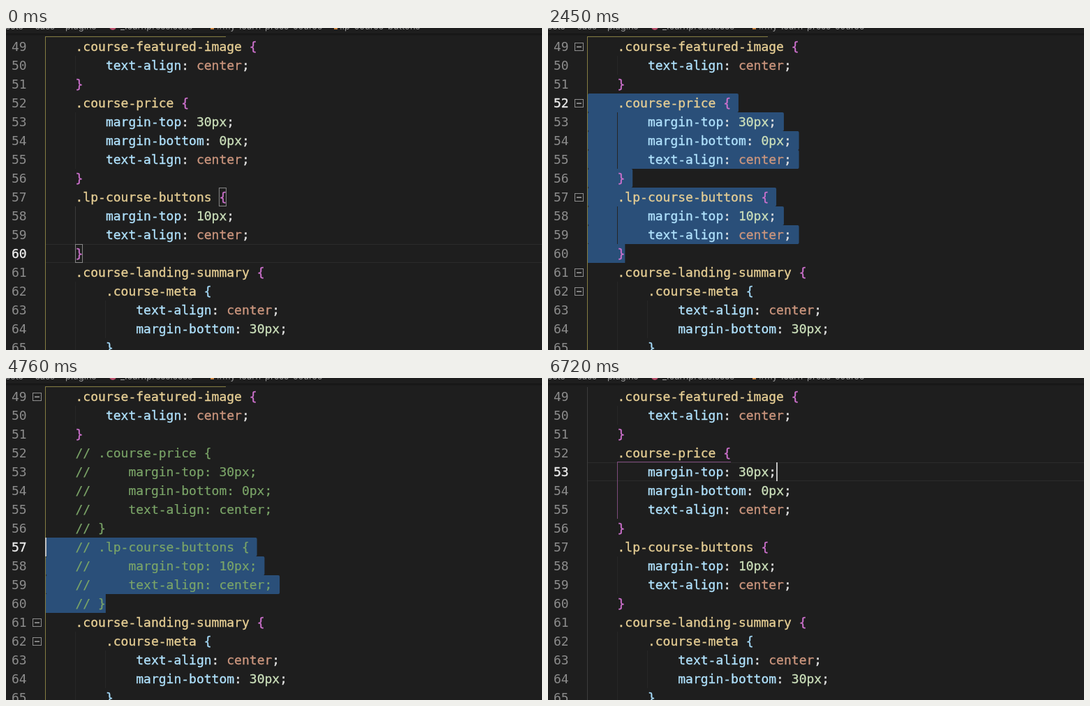
Animation, 768 px wide and 462 px high, one loop 6.79 s. Source, as an HTML page:

```html
<!DOCTYPE html>
<html lang="en">
<head>
<meta charset="utf-8">
<title>Commenting out a block</title>
<style>
html, body { margin: 0; width: 100%; height: 100%; overflow: hidden; background: #1e1e1e; }
svg { display: block; width: 768px; height: 462px; }
text { white-space: pre; }
.code { font: 18px "DejaVu Sans Mono", monospace; fill: #e4e4e4; stroke: #e4e4e4; stroke-width: 0.35px; }
.crumb { font: 13px Inter, sans-serif; fill: #9c9c9c; }
.num { fill: #8c8c8c; stroke: none; }
.num.active { fill: #ececec; stroke: #ececec; }
.selector { fill: #e6ce94; stroke: #e6ce94; }
.prop { fill: #b0e2fd; stroke: #b0e2fd; }
.value { fill: #cc967e; stroke: #cc967e; }
.digit { fill: #cbdfba; stroke: #cbdfba; }
.brace { fill: #cf72cf; stroke: #cf72cf; }
.deep { fill: #a5daf8; stroke: #a5daf8; }
.comment { fill: #7ba568; stroke: #7ba568; stroke-width: 0.2px; }
</style>
</head>
<body>
<svg id="stage" viewBox="0 0 768 462"></svg>
<script>
const LOOP = 6790, LEFT = 56.2, CHAR = 10.836, ROW = 27, TOP = 13, FIRST = 49;
const LINES = `    .course-featured-image {
        text-align: center;
    }
    .course-price {
        margin-top: 30px;
        margin-bottom: 0px;
        text-align: center;
    }
    .lp-course-buttons {
        margin-top: 10px;
        text-align: center;
    }
    .course-landing-summary {
        .course-meta {
            text-align: center;
            margin-bottom: 30px;
        }`.split("\n");

const stage = document.getElementById("stage");
const colX = c => LEFT + c * CHAR;
const rowY = n => TOP + (n - FIRST) * ROW;
const inBlock = n => n >= 52 && n <= 60;
const commented = s => s.slice(0, 4) + "// " + s.slice(4);
const lineText = (n, off) => off && inBlock(n) ? commented(LINES[n - FIRST]) : LINES[n - FIRST];

function add(tag, attrs, parent = stage, text) {
  const el = document.createElementNS("http://www.w3.org/2000/svg", tag);
  for (const k in attrs) el.setAttribute(k, attrs[k]);
  if (text !== undefined) el.textContent = text;
  return parent.appendChild(el);
}
const group = () => add("g", {});
const rect = (x, y, width, height, fill, parent) => add("rect", { x, y, width, height, fill }, parent);
const show = (el, on) => { el.style.display = on ? "" : "none"; };

function tokens(s) {
  const body = s.trim(), deep = s.startsWith("        ");
  const brace = deep ? "deep" : "brace";
  if (body === "}") return [[body, brace]];
  if (body[0] === ".") return [[body.slice(0, -1), "selector"], ["{", brace]];
  const [prop, value] = body.slice(0, -1).split(": ");
  return [[prop, "prop"], [": ", ""], [value, /\d/.test(value) ? "digit" : "value"], [";", ""]];
}

function drawLine(n, parent, off) {
  const s = LINES[n - FIRST], y = rowY(n) + 20;
  const text = add("text", { x: colX(4), y, class: "code" }, parent);
  if (off) return add("tspan", { class: "comment" }, text, commented(s).slice(4));
  text.setAttribute("x", colX(s.search(/\S/)));
  for (const [word, kind] of tokens(s)) add("tspan", { class: kind }, text, word);
}

// Current line and selection
const lineMark = group();
const markTop = rect(57, 0, 711, 1, "#2b2b2b", lineMark);
const markEnd = rect(57, 0, 711, 1, "#2b2b2b", lineMark);
const selection = [];
for (let n = 52; n <= 60; n++) {
  const r = rect(57, rowY(n), 0, ROW, "#2a4f79");
  if (n < 60) r.setAttribute("rx", 2);
  selection.push(r);
}

// Indent guides
const guide = (col, from, to, color, parent) =>
  rect(Math.floor(colX(col)), rowY(from), 1, (to - from + 1) * ROW, color, parent);
guide(4, 50, 50, "#262626");
guide(4, 62, 65, "#262626");
guide(8, 63, 64, "#262626");
const blockGuides = group(), nearGuide = group();
guide(4, 53, 55, "#262626", blockGuides);
guide(4, 58, 59, "#262626", blockGuides);
guide(4, 58, 59, "#3a3a3a", nearGuide);
const outerPlain = guide(0, 49, 65, "#3c3c3c");
const outerActive = group();
guide(0, 49, 65, "#857d42", outerActive);
rect(56, 12, 259, 1, "#857d42", outerActive);
const innerActive = group();
guide(4, 53, 55, "#7d4a7c", innerActive);
rect(99, 120, 163, 1, "#7d4a7c", innerActive);

// Code
const plain = group(), hidden = group();
const numbers = LINES.map((_, i) => {
  const n = FIRST + i;
  if (inBlock(n)) {
    drawLine(n, plain);
    drawLine(n, hidden, true);
  } else drawLine(n);
  return add("text", { x: 8, y: rowY(n) + 20, class: "code num" }, stage, n);
});

// Fold buttons
const folds = group(), blockFolds = add("g", {}, folds);
for (const n of [49, 52, 57, 61, 62]) {
  const parent = inBlock(n) ? blockFolds : folds, y = rowY(n) + 8;
  add("rect", { x: 38.5, y: y + 0.5, width: 12, height: 11, fill: "none", stroke: "#8e8e8e" }, parent);
  rect(41, y + 5.5, 7, 1.2, "#c5c5c5", parent);
}

// Matching brackets and caret
const pair = group();
for (const [col, n] of [[23, 57], [4, 60]])
  add("rect", { x: colX(col), y: rowY(n) + 0.5, width: 10, height: 26, fill: "none", stroke: "#888" }, pair);
const caret = rect(0, 0, 2, ROW, "#c0c0c0");

// Breadcrumbs
rect(0, 0, 768, 8, "#1e1e1e");
rect(0, 8, 768, 1.5, "#141414");
rect(0, 9.5, 768, 1.5, "#1a1a1a");
const crumb = (x, s) => add("text", { x, y: 2, class: "crumb" }, stage, s);
crumb(-15, "assets");
crumb(42, "sass");
crumb(85, "plugins");
add("circle", { cx: 153, cy: -2, r: 5, fill: "#b8506c" });
crumb(164, "_learnpress.scss");
rect(293, -5, 5, 7, "#c98545");
crumb(302, "#my-learn-press-course");
const lastIcon = rect(470, -5, 5, 7, "#c98545");
const lastCrumb = crumb(478, "");

const CRUMBS = [[0, ".lp-course-buttons"], [770, ".course-price"], [1400, ""]];
const DRAGS = [[280, 770], [4550, 5110]];
const COMMENT = 2940, CLICK = 3990, UNCOMMENT = 5880, LEAVE = 6370;

function pose(t) {
  const off = t >= COMMENT && t < UNCOMMENT;
  const s = { off, row: 60, col: off ? 8 : 5, selected: false, gutter: false, since: -500 };
  if (t >= LEAVE) return { ...s, row: 53, col: 25, since: LEAVE };
  const [start, end] = DRAGS[t < CLICK ? 0 : 1];
  if (t < start) return t >= CLICK ? { ...s, since: CLICK } : s;
  const p = Math.min(1, (t - start) / (end - start));
  s.row = 60 - Math.floor(p * 8);
  s.col = 0;
  s.selected = true;
  s.gutter = p > 0.3;
  s.since = p < 1 ? t : end;
  for (const edit of [COMMENT, UNCOMMENT]) if (t >= edit && edit > end) s.since = edit;
  return s;
}

function draw(t) {
  const s = pose(t), first = t < DRAGS[0][0], last = t >= LEAVE;
  show(plain, !s.off);
  show(blockGuides, !s.off);
  show(nearGuide, first);
  show(hidden, s.off);
  show(folds, s.gutter);
  show(blockFolds, !s.off);
  show(pair, first);
  show(outerPlain, last);
  show(outerActive, !last);
  show(innerActive, last);

  show(lineMark, !s.selected);
  markTop.setAttribute("y", rowY(s.row));
  markEnd.setAttribute("y", rowY(s.row + 1) - 1);
  selection.forEach((r, i) => {
    const n = 52 + i;
    show(r, s.selected && n >= s.row);
    r.setAttribute("width", colX(lineText(n, s.off).length + (n < 60 ? 1 : 0)) - 57);
  });
  numbers.forEach((el, i) => el.classList.toggle("active", FIRST + i === s.row));

  caret.setAttribute("x", Math.floor(colX(s.col)));
  caret.setAttribute("y", rowY(s.row));
  show(caret, (t - s.since) % 1000 < 500);

  const label = CRUMBS.filter(c => c[0] <= t).pop()[1];
  if (lastCrumb.textContent !== label) lastCrumb.textContent = label;
  show(lastIcon, label);
}

const began = performance.now();
function tick() {
  draw((performance.now() - began) % LOOP);
  requestAnimationFrame(tick);
}
tick();
</script>
</body>
</html>
```
